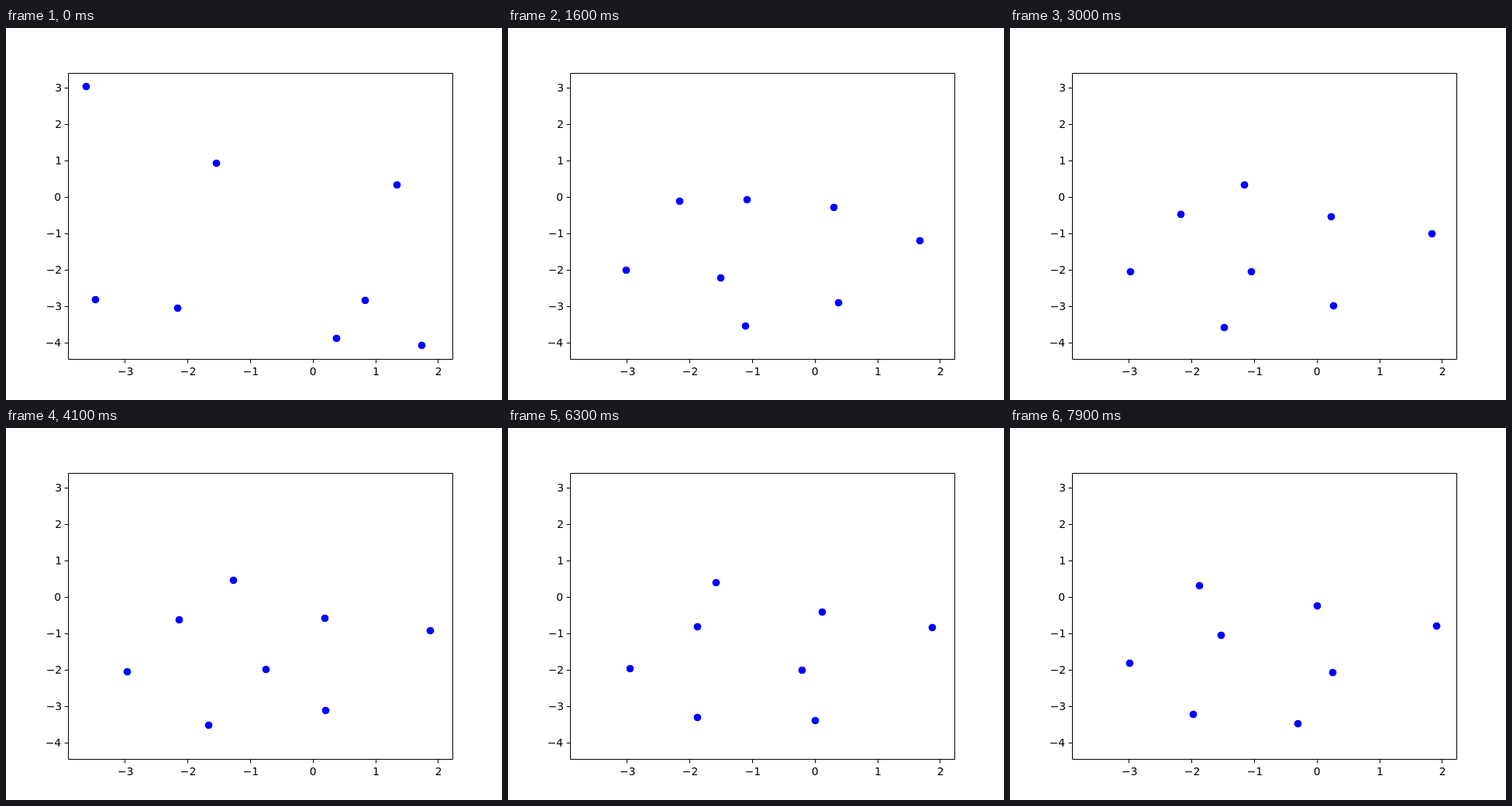
An HTML page that plays this animation: 640 by 480 pixels, repeating every 8000 ms.

```html
<!DOCTYPE html>
<html lang="en">
<head>
<meta charset="utf-8">
<title>Moving points</title>
<style>
  html, body { margin: 0; width: 100%; height: 100%; overflow: hidden; background: #fff; }
  svg { display: block; width: 640px; height: 480px; }
  text { font: 13.89px "DejaVu Sans", sans-serif; }
  .axes { fill: none; stroke: #000; }
  .dots { fill: #00f; }
</style>
</head>
<body>
<svg viewBox="0 0 640 480">
  <path class="axes"/>
  <g class="labels"></g>
  <g class="dots"></g>
</svg>
<script>
const LOOP = 8000, STEP = 100, DECAY = 3.4;
const find = s => document.querySelector(s);
const snap = v => Math.round(v) + 0.5;

function add(parent, tag, attrs, text = '') {
  const el = document.createElementNS('http://www.w3.org/2000/svg', tag);
  for (const k in attrs) el.setAttribute(k, attrs[k]);
  el.textContent = text;
  return parent.appendChild(el);
}

// Labels are aligned by the width of their ink, not of their advance
const pen = document.createElement('canvas').getContext('2d');
pen.font = '13.89px "DejaVu Sans", sans-serif';

function label(value, x, y, align) {
  const text = String(value).replace('-', '\u2212');
  const m = pen.measureText(text);
  const ink = m.actualBoundingBoxLeft + m.actualBoundingBoxRight;
  add(find('.labels'), 'text', { x: x - ink * align, y }, text);
}

let axes = 'M80.5 58.5H576.5V427.5H80.5Z';
for (let v = -3; v <= 2; v++) {
  const x = 395.75 + 80.8 * v;
  axes += `M${snap(x)} 427.5v4.86`;
  label(v, x, 448, 0.5);
}
for (let v = -4; v <= 3; v++) {
  const y = 218.5 - 47 * v;
  axes += `M80.5 ${y}h-4.86`;
  label(v, 70.28, y + 4.5, 1);
}
find('.axes').setAttribute('d', axes);

// Start of each point, then its place at each time in TIMES (seconds)
const TIMES = [1.6, 3, 5.5, 7.9];
const CENTRE = { x: 2639 / 8, y: 2322 / 8 };
const PATHS = [
  '103,75 222,224 220,240 234,253 272,267',
  '271,174 308,221 302,202 278,197 244,203',
  '504,202 420,231 414,243 408,241 396,229',
  '463,351 531,274 544,265 547,258 550,255',
  '115,350 152,312 155,314 157,312 154,303',
  '221,361 274,322 311,314 363,311 416,315',
  '426,400 306,384 276,386 249,377 236,369'
];

// Cubic through the given values (Lagrange)
const cubic = (values, t) => values.reduce((sum, v, i) =>
  sum + TIMES.reduce((p, s, j) => j === i ? p : p * (t - s) / (TIMES[i] - s), v), 0);

// Slow drift plus a fast settling from the start
function track([start, ...values]) {
  const offset = start - cubic(values, 0);
  return t => cubic(values, t) + offset * Math.exp(-DECAY * t);
}

const tracks = PATHS.map(path => {
  const keys = path.split(' ').map(p => p.split(',').map(Number));
  return { x: track(keys.map(k => k[0])), y: track(keys.map(k => k[1])) };
});

// The common centre stays put, which fixes the last point
const balance = axis => t =>
  tracks.reduce((rest, p) => rest - p[axis](t), 8 * CENTRE[axis]);
const points = [...tracks, { x: balance('x'), y: balance('y') }];
const dots = points.map(() => add(find('.dots'), 'circle', { r: 4.86 }));

function draw(now) {
  const t = Math.floor(now % LOOP / STEP) * STEP / 1000;
  points.forEach((p, i) => {
    dots[i].setAttribute('cx', snap(p.x(t)));
    dots[i].setAttribute('cy', snap(p.y(t)));
  });
}

const origin = performance.now();
function tick() {
  draw(performance.now() - origin);
  requestAnimationFrame(tick);
}
tick();
</script>
</body>
</html>
```
